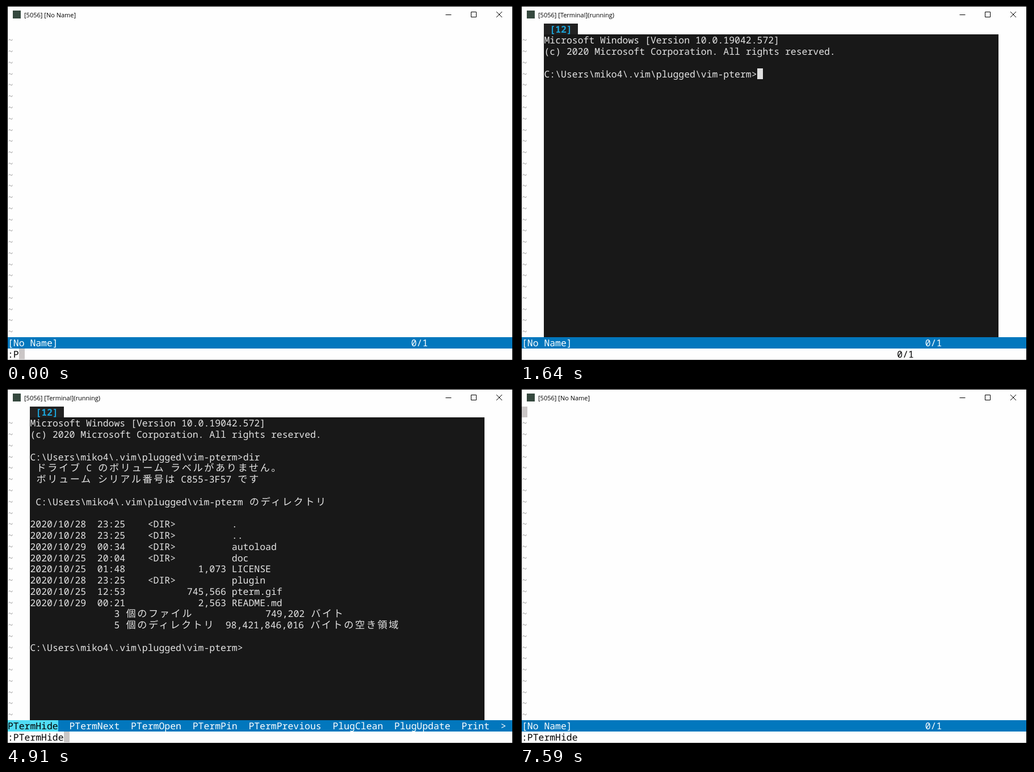
These frames come from a looping animation (895 px wide and 626 px high, 8000 ms). An HTML page:

```html
<!DOCTYPE html>
<html lang="ja">
<head>
<meta charset="utf-8">
<title>Terminal popup</title>
<style>
:root { --cw: 9.879px; --rh: 19.757px; --fs: 16.465px; --wide: 17.2px; }
html, body { margin: 0; width: 100%; height: 100%; overflow: hidden; background: #000; }
#stage { position: relative; width: 895px; height: 626px; overflow: hidden; background: #000; }
#stage div { position: absolute; }
#win { left: 3px; top: 1px; width: 889px; height: 623px; background: #fefefe; }
#icon { left: 12px; top: 8px; width: 14px; height: 14px; background: #35483e; }
#title { left: 32px; top: 6px; font: 11px/20px "Open Sans", "Noto Sans", sans-serif; color: #000; white-space: pre; }
#buttons { position: absolute; left: 770px; top: 6px; }
#grid { left: 2.9px; top: 30.7px; width: 889.1px; height: 593px; }
#grid div {
  left: calc(var(--c, 0) * var(--cw)); top: calc(var(--r, 0) * var(--rh));
  height: var(--rh); white-space: pre; color: #000;
  font: 500 var(--fs)/var(--rh) "Noto Sans Mono", "DejaVu Sans Mono", monospace;
  text-rendering: geometricPrecision; font-variant-ligatures: none;
}
#grid .box { width: calc(var(--w) * var(--cw)); height: calc(var(--h, 1) * var(--rh)); }
#grid .tilde { color: #a8a8a8; font-weight: 400; }
#grid .out { color: #e4e4e4; }
#grid .tab { color: #1ba4d9; font-weight: bold; }
#grid .white { color: #fff; }
.wide {
  font: 400 var(--wide)/0 "Noto Sans CJK JP", "Noto Sans CJK", sans-serif;
  position: relative; left: 1.3px; letter-spacing: calc(2 * var(--cw) - var(--wide));
}
.hide { visibility: hidden; }
</style>
</head>
<body>
<div id="stage">
  <div id="win"></div>
  <div id="icon"></div>
  <div id="title"></div>
  <svg id="buttons" width="110" height="20" fill="none" stroke="#000">
    <path d="M4.500 9.500h10M49.500 4.500h9v9h-9z"/>
    <path d="M94 4l10 10m0-10l-10 10"/>
  </svg>
  <div id="grid"></div>
</div>
<script>
const LOOP = 8000;
const $ = id => document.getElementById(id);
const grid = $('grid');

// Fills an element, giving full-width characters two cells each.
function fill(el, text) {
  el.textContent = '';
  for (const part of text.split(/([\u3000-\u9fff]+)/)) {
    if (/^[\u3000-\u9fff]/.test(part)) {
      const s = document.createElement('span');
      s.className = 'wide';
      s.textContent = part;
      el.append(s);
    } else el.append(part);
  }
}

function place(el, r, c) {
  el.style.setProperty('--r', r);
  el.style.setProperty('--c', c);
}

function put(r, c, text = '', cls = '') {
  const el = document.createElement('div');
  el.className = cls;
  place(el, r, c);
  fill(el, text);
  grid.append(el);
  return el;
}

function box(r, c, w, h, color) {
  const el = put(r, c, '', 'box');
  el.style.setProperty('--w', w);
  el.style.setProperty('--h', h);
  el.style.background = color;
  return el;
}

for (let r = 1; r < 28; r++) put(r, 0, '~', 'tilde');

const term = [box(0, 4, 6, 1, '#222'), box(1, 4, 81, 27, '#181818')];
box(28, 0, 90, 1, '#0277bd');
const pick = box(28, 0, 9, 1, '#50dcf4');
const cursor = box(0, 0, 1, 1, '#cac6c6');

const path = 'C:\\Users\\miko4\\.vim\\plugged\\vim-pterm';
term.push(
  put(0, 5, '[12]', 'tab'),
  put(1, 4, 'Microsoft Windows [Version 10.0.19042.572]', 'out'),
  put(2, 4, '(c) 2020 Microsoft Corporation. All rights reserved.', 'out'),
  put(4, 4, path + '>', 'out')
);
const typed = put(4, 42, '', 'out');

const entry = (date, time, size, name) =>
  `2020/10/${date}  ${time}` + (size ? size.padStart(18) : '    <DIR>'.padEnd(18)) + ' ' + name;
const listing = [
  ' ドライブ C のボリューム ラベルがありません。',
  ' ボリューム シリアル番号は C855-3F57 です',
  '',
  ` ${path} のディレクトリ`,
  '',
  entry(28, '23:25', '', '.'),
  entry(28, '23:25', '', '..'),
  entry(29, '00:34', '', 'autoload'),
  entry(25, '20:04', '', 'doc'),
  entry(25, '01:48', '1,073', 'LICENSE'),
  entry(28, '23:25', '', 'plugin'),
  entry(25, '12:53', '745,566', 'pterm.gif'),
  entry(29, '00:21', '2,563', 'README.md'),
  ' '.repeat(15) + '3 個のファイル' + ' '.repeat(13) + '749,202 バイト',
  ' '.repeat(15) + '5 個のディレクトリ  98,421,846,016 バイトの空き領域',
  '',
  path + '>'
].map((line, i) => put(5 + i, 4, line, 'out'));

const status = put(28, 0, '', 'white');
const picked = put(28, 0);
const cmd = put(29, 0);

// Timelines: [start, value...]
const PLAIN = '[No Name]'.padEnd(72) + '0/1';
const gap = ' '.repeat(11);
const statuses = [
  [0, PLAIN, ''],
  [150, gap + 'PlugClean  PlugUpdate  Print', 'PTermOpen'],
  [1520, PLAIN, ''],
  [4910, gap + 'PTermNext  PTermOpen  PTermPin  PTermPrevious  PlugClean  PlugUpdate  Print  >', 'PTermHide'],
  [6040, PLAIN, '']
];
const ruler = ' '.repeat(67) + '0/1';
const commands = [
  [0, ':P'], [150, ':PTermOpen'], [1640, ruler], [4040, ruler.padEnd(79) + '^W'],
  [4350, ':'], [4630, ':P'], [4910, ':PTermHide']
];
const keys = [[0, ''], [2380, 'd'], [2500, 'di'], [2810, 'dir']];
const cursors = [
  [0, 29, 2], [150, 29, 10], [860], [1120, 29, 10], [1520, 29, 0],
  [1640, 4, 42], [2380, 4, 43], [2500, 4, 44], [2810, 4, 45],
  [3090, 21, 42], [3670], [3920, 21, 42],
  [4350, 29, 1], [4630, 29, 2], [4910, 29, 10], [5620], [5910, 29, 10],
  [6040, 0, 0], [6750], [6870, 0, 0], [7310], [7590, 0, 0]
];

const at = (list, t) => list.findLast(step => step[0] <= t);
const show = (els, on) => els.forEach(el => el.classList.toggle('hide', !on));
const setText = (el, text) => { if (el.textContent !== text) el.textContent = text; };

function draw(t) {
  const open = t >= 1640 && t < 6040;
  show(term, open);
  show([typed], open);
  show(listing, open && t >= 3090);
  setText($('title'), '[5056] ' + (open ? '[Terminal](running)' : '[No Name]'));
  setText(typed, at(keys, t)[1]);
  setText(cmd, at(commands, t)[1]);

  const [, bar, choice] = at(statuses, t);
  setText(status, bar);
  setText(picked, choice);
  show([pick], choice);

  const [, r, c] = at(cursors, t);
  show([cursor], r !== undefined);
  if (r !== undefined) {
    place(cursor, r, c);
    cursor.style.background = open && r < 28 ? '#e0e0e0' : '#cac6c6';
  }
}

const start = performance.now();
function tick() {
  draw((performance.now() - start) % LOOP);
  requestAnimationFrame(tick);
}
tick();
</script>
</body>
</html>
```
